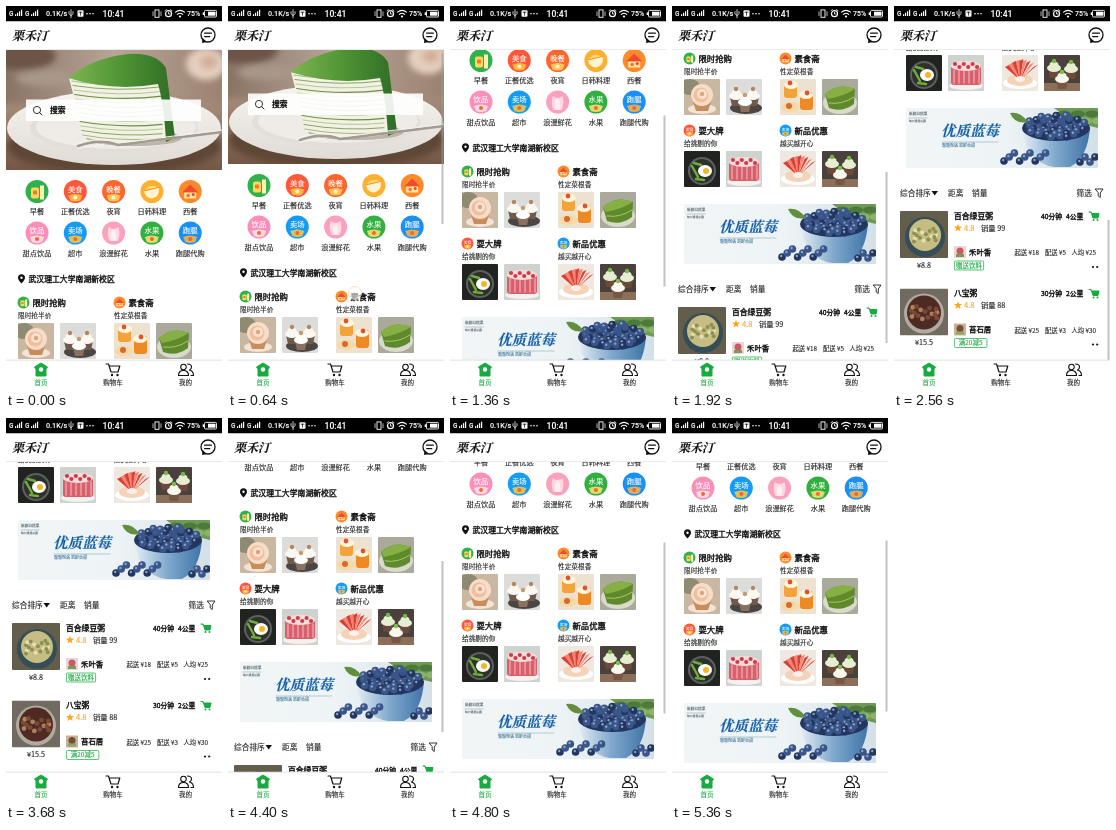
Recreate the animation shown at these times as an HTML page. Size 216 by 384 pixels, loop 5440 ms.

```html
<!DOCTYPE html>
<html lang="zh-CN">
<head>
<meta charset="utf-8">
<title>外卖首页</title>
<style>
html, body { margin: 0; width: 100%; height: 100%; overflow: hidden; background: #fff }
svg { display: block; width: 100vw; height: 100vh; font-family: "Noto Sans CJK SC", "Noto Sans CJK", "Noto Sans", sans-serif }
text { stroke-width: .12px }
.bold { stroke-width: .36px }
.latin { font-family: Roboto, "Open Sans", sans-serif; font-weight: 500 }
.brush { font-family: "Noto Serif CJK SC", "Noto Sans CJK SC", serif; font-style: italic; font-weight: 700 }
</style>
</head>
<body>
<svg id="stage" viewBox="0 0 216 384"></svg>
<script>
const LOOP = 5440, STEP = 80, TOP = 44, TABS = 354, GREEN = '#18ab3f';

// Shape helpers return SVG markup; text is placed by its vertical centre.
const rect = (x, y, w, h, fill, more = '') => `<rect x="${x}" y="${y}" width="${w}" height="${h}" fill="${fill}" ${more}/>`;
const oval = (x, y, rx, ry, fill, more = '') => `<ellipse cx="${x}" cy="${y}" rx="${rx}" ry="${ry}" fill="${fill}" ${more}/>`;
const dot = (x, y, r, fill, more) => oval(x, y, r, r, fill, more);
const path = (d, fill, more = '') => `<path d="${d}" fill="${fill}" ${more}/>`;
const line = (d, color = '#111', w = 1) => path(d, 'none', `stroke="${color}" stroke-width="${w}" stroke-linecap="round" stroke-linejoin="round"`);
const text = (x, y, s, size, fill = '#111', more = '') => `<text x="${x}" y="${y + size * .37}" font-size="${size}" fill="${fill}" stroke="${fill}" ${more}>${s}</text>`;
const mid = 'text-anchor="middle"', bold = 'class="bold"', latin = 'class="latin"', brush = 'class="brush"';
const at = (x, y, body, more = '') => `<g transform="translate(${x} ${y}) ${more}">${body}</g>`;
const repeat = (n, f) => Array.from({ length: n }, (_, i) => f(i)).join('');
const gradient = (id, dir, ...stops) => `<linearGradient id="${id}" ${dir}>` +
  stops.map((c, i) => `<stop offset="${i / (stops.length - 1)}" stop-color="${c}"/>`).join('') + '</linearGradient>';
const clip = (id, x, y, w, h) => `<clipPath id="${id}">${rect(x, y, w, h, '#000', 'rx="1"')}</clipPath>`;
const down = 'x1="0" y1="0" x2="0" y2="1"';

const defs = `<defs>
  ${gradient('wall', '', '#8a7464', '#b7a598', '#9c8270')}
  ${gradient('cloth', down, '#a58c7a', '#6d4f3d')}
  ${gradient('plate', down, '#f6f3ee', '#e0dbd5')}
  ${gradient('matcha', '', '#7fb552', '#4f9434', '#2f6c26')}
  ${gradient('sky', '', '#f1f5f6', '#eef4f6', '#d3e0e7')}
  ${gradient('bowl', '', '#e6eef4', '#7fa8cc', '#3f74a8')}
  ${clip('view', 0, TOP, 216, TABS - TOP)}${clip('hero', 0, 44, 216, 120)}
  ${clip('banner', 12, 442, 192, 60)}${clip('thumb', 0, 0, 36, 36)}${clip('dish', 0, 0, 48, 47)}
  <filter id="soft"><feGaussianBlur stdDeviation="3"/></filter>
</defs>`;

function hero() {
  const layers = repeat(13, i => line(`M${66 + i * .9} ${75 + i * 4.5}Q${112 + i * .4} ${82 + i * 4.5} 156 ${76 + i * 4.7}`, i % 2 ? '#6f8d4a' : '#a9b98a', i % 3 ? .8 : 1.2));
  return `<g clip-path="url(#hero)">
    ${rect(0, 44, 216, 120, 'url(#wall)')}
    <g filter="url(#soft)">
      ${oval(16, 50, 34, 14, '#6c5546')}${oval(40, 72, 30, 8, '#a8978a')}
      ${oval(200, 58, 20, 16, '#e5d0c0')}${oval(203, 56, 9, 7, '#d3ae99')}
      ${rect(-9, 98, 234, 75, 'url(#cloth)')}${oval(108, 140, 108, 28, '#5f4636')}
    </g>
    ${oval(108, 122, 107, 37, 'url(#plate)')}${oval(108, 122, 84, 25, '#e3ded8')}${oval(110, 121, 80, 22, '#efebe6')}
    ${oval(128, 132, 48, 8, '#bdb5a9')}
    ${path('M63 72Q112 84 158 72L165 133Q118 143 78 131Z', '#f1f2e2')}${layers}
    ${path('M62 72Q86 52 122 48Q150 46 160 62L169 132L160 136Q158 98 152 78Q108 86 62 72Z', 'url(#matcha)')}
    ${line('M72 140Q96 132 112 139L216 126', '#a39a92', 2.6)}${line('M70 138Q94 130 112 137L216 124M72 142L98 138', '#f5f2ee', 1.2)}
  </g>
  ${rect(20, 93.5, 175, 21.5, '#fff', 'fill-opacity=".9"')}
  ${dot(31, 104, 3.6, 'none', 'stroke="#222" stroke-width=".9"')}${line('M33.7 106.7L36 109', '#222')}
  ${text(44, 104.5, '搜索', 7.8, '#111', bold)}`;
}

// Category badges: colour, caption inside the circle, label underneath.
const kinds = [
  ['#2fb14b', '', '早餐'], ['#ff5738', '美食', '正餐优选'], ['#ff662b', '晚餐', '夜宵'],
  ['#ffb02e', '', '日韩料理'], ['#ff8a2a', '', '西餐'],
  ['#fb8fb9', '饮品', '甜点饮品'], ['#149cf5', '卖场', '超市'], ['#fba0bd', '', '浪漫鲜花'],
  ['#32b03f', '水果', '水果'], ['#1a90f5', '跑腿', '跑腿代购']
];
const pictures = {
  0: rect(-6, -4, 8, 11, '#ffd65c', 'rx="2"') + rect(-4, -1, 4, 4, '#f4772f', 'rx="1"') + path('M3-6H7V8H3Z', '#fff0b8'),
  3: path('M-8 0L7-4Q8 6 0 7Q-6 7-8 0Z', '#fff3d2') + path('M-7-1Q-3-8 6-4Z', '#ffdc7a') + line('M-7-1L7-4', '#f08a24', .8),
  4: path('M-8 1L0-7L8 1Z', '#ee4b2f') + rect(-6, 1, 12, 6, '#ffe4a0') + dot(-2, 4, 1.8, '#f4772f') + dot(3, 3, 1.5, '#e8442e'),
  7: path('M-5-6Q0-2 5-6Q7 2 4 8H-4Q-7 2-5-6Z', '#ffd9e2') + path('M0-4Q4 1 2 8H-2Q-4 1 0-4Z', '#ffeef2')
};
function badge(i, x, y, scale = 1) {
  const [color, caption] = kinds[i];
  const inner = caption
    ? path('M-7 4Q0 1 7 4L5 9Q0 11-5 9Z', ['#ffe9f0', '#ffc93f', '#ffd65c', '#ffe27a', '#ffb347'][i % 5], 'fill-opacity=".85"') +
      dot(0, 6, 2, i < 5 ? '#fff1cc' : '#f4682f') + text(0, -2.5, caption, 7.4, '#fff', mid)
    : pictures[i];
  return at(x, y, dot(0, 0, 11.5, color) + inner, `scale(${scale})`);
}
const categories = () => kinds.map(([, , label], i) => {
  const x = 31 + i % 5 * 38.3, y = i < 5 ? 185.5 : 227;
  return badge(i, x, y) + text(x, y + 20, label, 7.2, '#222', mid);
}).join('');

const cupcake = (x, y, cream, cup, top) =>
  path(`M${x - 6} ${y}H${x + 6}L${x + 4} ${y + 9}H${x - 4}Z`, cup) + oval(x, y - 1, 7, 4, cream) +
  oval(x, y - 4, 4.5, 3.5, cream) + dot(x, y - 8, 2.2, top);
const foods = [
  () => rect(0, 0, 36, 36, '#c9b7a2') + oval(6, 8, 10, 8, '#8f8a72') + oval(18, 30, 14, 5, '#f1e4d6') + path('M8 20H28L24 32H12Z', '#c98d5c') +
    dot(18, 16, 11, '#f7dcc8') + dot(17, 16, 7.5, '#efbf9f') + dot(18, 15, 5, '#f9e2d0') + dot(18, 15, 2.2, '#e3a27e'),
  () => rect(0, 0, 36, 36, '#dcdcda') + oval(20, 29, 16, 6, '#4b4643') + cupcake(10, 18, '#fbf8f2', '#6e5a4d', '#b7865d') +
    cupcake(27, 18, '#fbf8f2', '#6e5a4d', '#b7865d') + cupcake(19, 24, '#fff', '#8b7160', '#c79a6b'),
  () => rect(0, 0, 36, 36, '#ece2cf') + rect(4, 4, 13, 15, '#f3a33c', 'rx="3"') + oval(11, 6, 7, 4, '#fff4dc') + dot(10, 4, 2.4, '#e2522c') +
    rect(20, 13, 13, 18, '#ee8a25', 'rx="3"') + oval(26, 16, 7, 4, '#fff4dc') + dot(27, 14, 2.4, '#e2522c') + oval(10, 28, 9, 5, '#f7d9a3') + dot(9, 27, 3, '#d9692e'),
  () => rect(0, 0, 36, 36, '#a9aa9a') + oval(18, 24, 17, 11, '#d9dacb') + path('M3 15Q16 3 33 10L32 25Q20 34 7 29Z', '#5f8a2c') +
    path('M3 15Q16 3 33 10Q22 17 6 20Z', '#86b043') + line('M7 24Q20 26 32 18', '#a9c56d', 1),
  () => rect(0, 0, 36, 36, '#20231f') + dot(18, 20, 14, '#5b615e') + dot(18, 20, 12, '#2e302b') + oval(21, 20, 7, 6, '#fff') +
    dot(22, 20, 3, '#f6b522') + line('M8 15L14 26M10 12L17 14M12 28L20 29', '#70ae38', 2.4),
  () => rect(0, 0, 36, 36, '#cfd3d0') + oval(18, 31, 17, 4, '#f4f1ee') + rect(3, 10, 30, 20, '#d8606d', 'rx="3"') +
    repeat(6, i => line(`M${6 + i * 5} 15V28`, '#eb9da2', 1.6)) + oval(18, 11, 15, 5, '#f7dcd9') + repeat(6, i => dot(7 + i * 4.4, 9 + i % 2 * 3, 2.1, '#cf3b4a')),
  () => rect(0, 0, 36, 36, '#efe8e0') + oval(18, 28, 17, 6, '#fff') + oval(18, 25, 13, 6, '#f5d3b8') +
    repeat(9, i => path(`M18 25L${3 + i * 3.6} ${12 - 6 * Math.sin(i * .39)}l4-2Z`, i % 2 ? '#f58572' : '#da3f36')) + oval(18, 24, 5, 3, '#fdf0ea'),
  () => rect(0, 0, 36, 36, '#4a403c') + rect(0, 28, 36, 8, '#8b6f58') + cupcake(10, 14, '#e6eed2', '#6b4a3c', '#75b646') +
    cupcake(27, 15, '#e6eed2', '#6b4a3c', '#75b646') + cupcake(18, 25, '#f6f8ec', '#785645', '#7fbe4a')
];
const thumb = (i, x, y) => at(x, y, `<g clip-path="url(#thumb)">${foods[i]()}</g>`);

function sections() {
  const list = [['限时抢购', '限时抢半价', 0], ['素食斋', '性定菜根香', 4], ['耍大牌', '给挑剔的你', 1], ['新品优惠', '越买越开心', 6]];
  return list.map(([title, note, icon], i) => {
    const x = 12 + i % 2 * 96, y = i < 2 ? 296.5 : 368.5;
    return badge(icon, x + 5.5, y, .52) + text(x + 14.5, y, title, 8.4, '#111', bold) +
      text(x, y + 13.5, note, 6.7, '#222') + thumb(i * 2, x, y + 20.5) + thumb(i * 2 + 1, x + 42, y + 20.5);
  }).join('');
}

function banner() {
  const berry = (x, y, i) => dot(x, y, 3.8, i % 3 ? '#3a5589' : '#22365f') + dot(x - .8, y - 1, 1.2, '#8ba3c8');
  const heap = repeat(48, i => {
    const r = Math.sqrt(i / 48), a = i * 2.4;
    return berry(162 + 30 * r * Math.cos(a), 460 + 12 * r * Math.sin(a), i);
  });
  return `<g clip-path="url(#banner)">
    ${rect(12, 442, 192, 60, 'url(#sky)')}
    ${path('M160 442H204V462Q180 458 160 442Z', '#6f9a55')}${repeat(6, i => oval(170 + i * 7, 448 + i % 2 * 7, 7, 3.4, i % 2 ? '#8cb36a' : '#4b7a3a'))}
    ${path('M128 461Q132 497 160 501H176Q194 492 196 461Z', 'url(#bowl)')}
    ${oval(162, 462, 34, 13, '#22365f')}${heap}
    ${path('M134 456Q126 445 116 447Q121 459 134 456Z', '#638e40')}
    ${repeat(9, i => berry(110 + i * 5.2, 495 - i % 3 * 4, i))}${repeat(4, i => berry(186 + i * 5, 496 - i % 2 * 5, i))}
  </g>
  ${text(15, 448, '新鲜自然果', 3.7, '#4e626b')}${line('M15 452H33', '#7b939d', .5)}
  ${text(15, 455, '每日清晨采摘', 2.8, '#667b83')}
  ${text(47, 465, '优质蓝莓', 14.5, '#145fa8', brush)}
  ${line('M48 476H104', '#6c9db8', .5)}${text(48, 480, '颗颗饱满 新鲜香甜', 4, '#4d819e')}`;
}

const cart = 'M-5-4H-3L-1 2H4L5-2.5H-2.6';
function shop(y, name, time, distance, sales, store, fees, price, tag, dark) {
  const bowl = dark
    ? rect(0, 0, 48, 47, '#716a61') + dot(24, 25, 20, '#b1aaa0') + dot(24, 24, 17, '#4d2b22') + repeat(16, i => dot(24 + 13 * Math.cos(i * 2.4), 24 + 11 * Math.sin(i * 3.1), 2.4, i % 3 ? '#7b4934' : '#ae805c'))
    : rect(0, 0, 48, 47, '#635d4c') + dot(25, 26, 20, '#354d56') + dot(25, 24, 16, '#c5bd83') + repeat(18, i => dot(25 + 11 * Math.cos(i * 2.4), 24 + 10 * Math.sin(i * 3.1), 2, i % 3 ? '#8e9050' : '#e7dfb4'));
  const star = repeat(10, i => {
    const r = i % 2 ? 1.8 : 4.3, a = i * Math.PI / 5 - Math.PI / 2;
    return `${(64 + r * Math.cos(a)).toFixed(2)},${(17 + r * Math.sin(a)).toFixed(2)} `;
  });
  const wide = tag.length * 6.3 + 4 - (dark ? 3 : 0);
  return at(0, y, `${at(6, 0, `<g clip-path="url(#dish)">${bowl}</g>`)}
    ${text(60, 5, name, 7.8, '#111', bold)}${text(147, 5, time, 6.8, '#111', bold)}${text(172, 5, distance, 6.8, '#111', bold)}
    ${at(200, 5, path(cart + 'Z', GREEN) + line(cart, GREEN) + dot(-.5, 4, 1, GREEN) + dot(3.5, 4, 1, GREEN))}
    <polygon points="${star}" fill="#ffa51f"/>${text(70, 17, '4.8', 7.6, '#ffa51f')}${text(87, 17, '销量 ' + sales, 7.3, '#222')}
    ${rect(60, 35, 12, 12, dark ? '#c9b397' : '#ead6d5')}${dot(66, 40, 3.5, dark ? '#735034' : '#cc5867')}${rect(62, 43, 8, 3, dark ? '#92a267' : '#789c55')}
    ${text(75, 41, store, 7.4, '#111', bold)}
    ${['起送', '配送', '人均'].map((s, i) => text([120.5, 151, 177.5][i], 42, `${s} ¥${fees[i]}`, 6.3, '#222')).join('')}
    ${text(30, 54, '¥' + price, 7.2, '#222', mid)}
    ${rect(60.4, 50, wide, 9, '#fff', `stroke="${GREEN}" stroke-width=".7" rx="1"`)}${text(60.4 + wide / 2, 54.3, tag, 6.5, GREEN, mid)}
    ${dot(199, 56, 1.1, '#111')}${dot(203.2, 56, 1.1, '#111')}`);
}

const page = () => hero() + categories() +
  path('M15.5 277.5Q11.7 273.5 12 271.7A3.5 3.5 0 0 1 19 271.7Q19.2 273.5 15.5 277.5Z', '#111') + dot(15.5, 271.7, 1.2, '#fff') +
  text(22.5, 273, '武汉理工大学南湖新校区', 7.85, '#111', bold) +
  sections() + banner() +
  text(6, 527, '综合排序', 7.7, '#222') + path('M37.5 525H44L40.7 529.5Z', '#111') +
  text(54, 527, '距离', 7.7, '#222') + text(78, 527, '销量', 7.7, '#222') + text(182.5, 527, '筛选', 7.7, '#222') +
  line('M201.5 523H209L206.3 527V531.5L204.2 530V527Z', '#222', .9) +
  shop(545, '百合绿豆粥', '40分钟', '4公里', 99, '禾叶香', [18, 5, 25], '8.8', '赠送饮料', false) +
  shop(622.5, '八宝粥', '30分钟', '2公里', 88, '苔石居', [25, 3, 30], '15.5', '满20减5', true);

function statusBar() {
  const bars = x => repeat(4, i => rect(x + i * 2, 8.5 - i * 1.5, 1.2, 1.8 + i * 1.5, '#fff'));
  return rect(0, 0, 216, 15.5, '#000') + at(0, -.3,
    text(3, 7.8, 'G', 6.5, '#fff', latin) + bars(9) + text(19, 7.8, 'G', 6.5, '#fff', latin) + bars(25) +
    text(40, 7.8, '0.1K/s', 7.2, '#fff', latin) +
    line('M65 4V12M63 6V8L65 10L67 8V6', '#fff', .8) + rect(71.5, 4.5, 6, 6.5, '#fff', 'rx="1"') + line('M73 6.5H76M74.5 6.5V9.5', '#000', .7) +
    repeat(3, i => dot(81 + i * 3, 8, .8, '#fff')) +
    text(107.5, 7.8, '10:41', 8.6, '#fff', mid + ' ' + latin) +
    rect(149, 4.2, 4, 7.4, 'none', 'stroke="#fff" stroke-width=".9"') + line('M147 6V10M155 6V10', '#fff', .7) +
    dot(162.5, 8, 3, 'none', 'stroke="#fff" stroke-width="1.2"') + line('M159 5L160.5 4M166 5L164.5 4M162.5 6.5V8.3H164', '#fff', .8) +
    line('M169.5 6.5Q174 2.8 178.5 6.5M171.3 8.7Q174 6.5 176.7 8.7', '#fff', 1.1) + dot(174, 10.8, 1.1, '#fff') +
    text(181, 7.8, '75%', 7, '#fff', latin) +
    rect(198.5, 4.7, 12, 6.6, 'none', 'stroke="#fff" stroke-width=".9" rx="1"') + rect(202, 6, 7.5, 4, '#fff') + rect(196.7, 6.7, 1.3, 2.6, '#fff'));
}

const header = () => rect(0, 15.5, 216, TOP - 15.5, '#fff') + rect(0, TOP - .6, 216, .6, '#ddd') +
  text(6, 29.5, '栗禾汀', 12, '#111', brush) +
  dot(202, 29, 7, '#fff', 'stroke="#111" stroke-width="1.3"') + path('M196.5 32L196 37L201 36Z', '#111') +
  line('M198.6 27.2H205.4M198.6 30.6H203.8', '#111', 1.2);

const tabs = () => rect(0, TABS, 216, 384 - TABS, '#fff') + rect(0, TABS - .3, 216, .8, '#d3dbe0') +
  path('M28.5 361L35 357L41.5 361L40 363V370H30V363Z', GREEN, `stroke="${GREEN}" stroke-linejoin="round"`) + dot(35, 363.5, 2.2, '#fff') +
  at(107, 363, line('M-7-5H-4.5L-2 3H5L6.8-3H-3.8', '#111', 1.2) + dot(-1, 6, 1.2, '#111') + dot(4.5, 6, 1.2, '#111')) +
  at(179.5, 364, dot(-2, -3, 2.8, '#fff', 'stroke="#111" stroke-width="1.1"') + line('M-7 5.5Q-7 .5-2 .5Q3 .5 3 5.5ZM2-6Q6-6 6-3Q6-1 4 0Q8 1 8 5.5H5.5', '#111', 1.1)) +
  text(35, 377, '首页', 6.5, GREEN, mid) + text(107, 377, '购物车', 6.5, '#222', mid) + text(179.5, 377, '我的', 6.5, '#222', mid);

// The finger sits on the page, so it travels with the first drag.
const finger = dot(127, 293, 6.5, '#fff', 'id="finger" fill-opacity=".6" stroke="#f6dcb4" stroke-width=".8"');
const stage = document.getElementById('stage');
stage.innerHTML = defs + rect(0, 0, 216, 384, '#fff') +
  `<g clip-path="url(#view)"><g id="page">${page()}${finger}</g>${rect(213.5, TOP, 2, 171, '#999', 'id="bar" fill-opacity=".6"')}</g>` +
  statusBar() + header() + tabs();

// Scroll stops: time, offset, easing towards that stop.
const linear = k => k, easeIn = k => k ** 1.4, easeOut = k => 1 - (1 - k) ** 2.5;
const stops = [[560, 0], [640, 6, linear], [1360, 131, linear], [2400, 340, linear], [4000, 340, linear], [4400, 198, easeIn], [5040, 157, easeOut]];
function scrollAt(t) {
  const i = stops.findIndex(s => t < s[0]);
  if (i < 0) return stops.at(-1)[1];
  if (!i) return 0;
  const [t0, y0] = stops[i - 1], [t1, y1, ease] = stops[i];
  return y0 + (y1 - y0) * ease((t - t0) / (t1 - t0));
}
const barOpacity = t => t < 560 ? 0 : t < 4000 ? Math.max(0, Math.min(1, (3120 - t) / 240)) : t > 4000 ? 1 : 0;

const [pageNode, barNode, fingerNode] = ['page', 'bar', 'finger'].map(id => document.getElementById(id));
const start = performance.now();
function draw() {
  const t = Math.floor((performance.now() - start) % LOOP / STEP) * STEP, y = Math.round(scrollAt(t));
  pageNode.setAttribute('transform', `translate(0 ${-y})`);
  barNode.setAttribute('y', TOP + y * .5);
  barNode.setAttribute('opacity', barOpacity(t));
  fingerNode.setAttribute('opacity', t >= 560 && t < 960 ? 1 : 0);
  requestAnimationFrame(draw);
}
draw();
</script>
</body>
</html>
```
